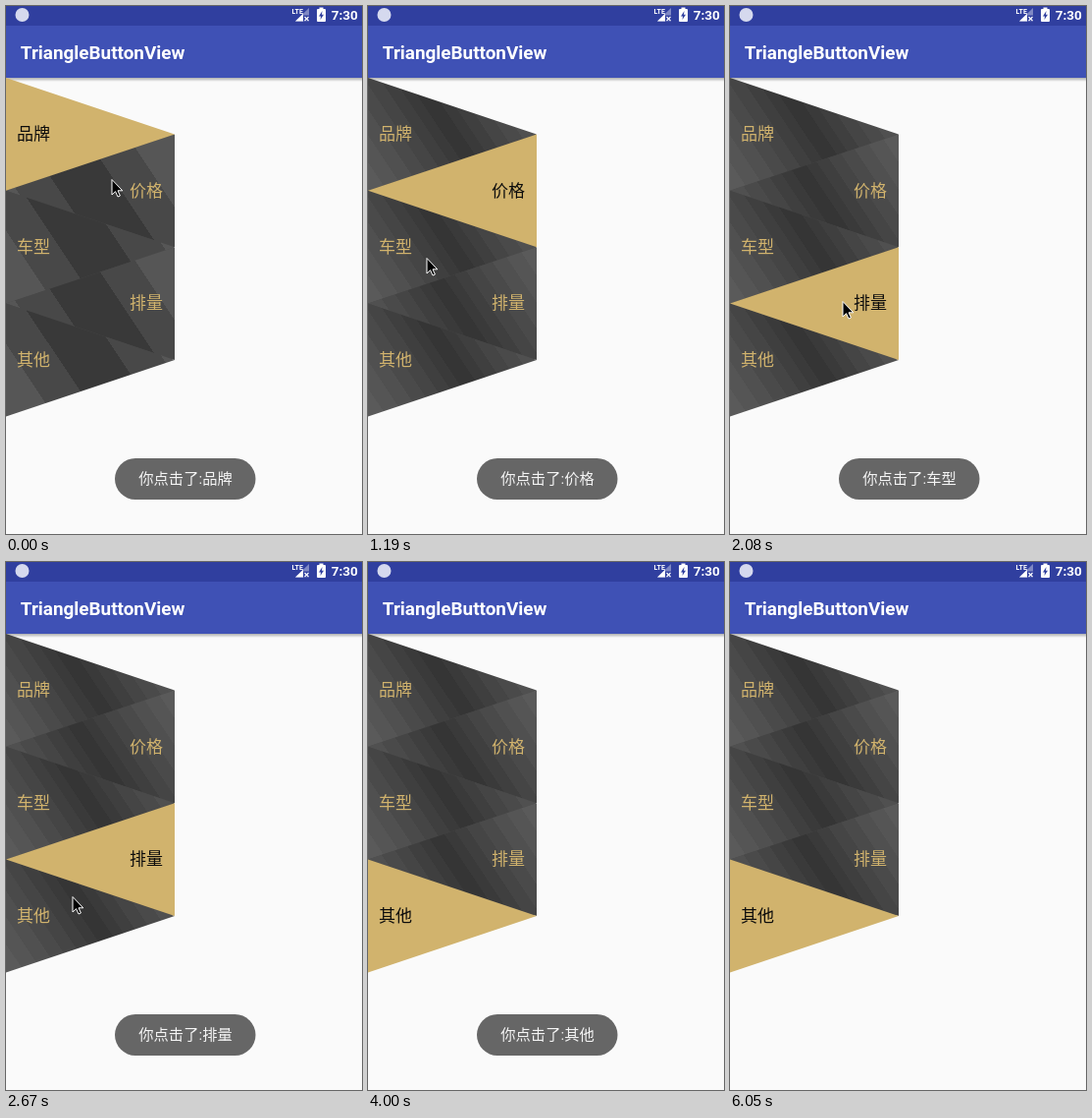
An HTML page with a canvas for the animation above (6.15 s loop, 363x537 px).

```html
<!DOCTYPE html>
<html lang="zh-CN">
<head>
<meta charset="utf-8">
<title>TriangleButtonView</title>
<style>
html, body { margin: 0; width: 100%; height: 100%; overflow: hidden; background: #fafafa; }
canvas { display: block; }
</style>
</head>
<body>
<canvas id="stage" width="363" height="537"></canvas>
<script>
const ctx = document.getElementById('stage').getContext('2d');
const LOOP = 6150, STEP = 148.3, TRAVEL = 300;
const TOP = 73, HALF = 57.4, WIDTH = 172;
const GOLD = '#d1b36d';
const FONT = 'Roboto, "Noto Sans CJK SC", "Noto Sans CJK", sans-serif';

const BUTTONS = [
  { label: '品牌', clicked: 0 },
  { label: '价格', clicked: 440 },
  { label: '车型', clicked: 1330 },
  { label: '排量', clicked: 2070 },
  { label: '其他', clicked: 3400 },
];
const POINTER_STOPS = [
  { arrive: 0, x: 108, y: 176 },
  { arrive: 1180, x: 60, y: 256 },
  { arrive: 2060, x: 115, y: 300 },
  { arrive: 2660, x: 68, y: 340 },
  { arrive: 2960, x: 45, y: 370 },
  { arrive: 4000, x: -14, y: 396 },
];

const clamp = k => Math.max(0, Math.min(1, k));
const mix = (a, b, k) => a + (b - a) * k;
const ease = k => (1 - Math.cos(Math.PI * clamp(k))) / 2;
const lastClicked = t => BUTTONS.filter(b => b.clicked <= t).pop() || BUTTONS[0];

function polygon(points, fill, stroke) {
  ctx.beginPath();
  points.forEach(([x, y]) => ctx.lineTo(x, y));
  ctx.closePath();
  ctx.fillStyle = fill;
  ctx.fill();
  if (stroke) {
    ctx.strokeStyle = stroke;
    ctx.lineWidth = 1;
    ctx.stroke();
  }
}

function rect(x, y, w, h, fill) {
  ctx.fillStyle = fill;
  ctx.fillRect(x, y, w, h);
}

function pill(x, y, w, h, r, fill) {
  ctx.beginPath();
  ctx.roundRect(x, y, w, h, r);
  ctx.fillStyle = fill;
  ctx.fill();
}

function text(str, x, y, size, fill, align = 'left', weight = 400) {
  ctx.font = `${weight} ${size}px ${FONT}`;
  ctx.textAlign = align;
  ctx.fillStyle = fill;
  ctx.fillText(str, x, y);
}

// Grey bands from bottom left to top right, darkest in the middle.
function bandedGradient(y, levels) {
  const gradient = ctx.createLinearGradient(0, y + 2 * HALF, WIDTH, y);
  const bandEdge = i => Math.sign(i) * (Math.abs(i) / levels) ** 1.25 / 2 + 0.5;
  for (let i = -levels; i < levels; i++) {
    const grey = Math.round(mix(50, 93, Math.abs(i + 0.5) / levels));
    const color = `rgb(${grey},${grey},${grey})`;
    gradient.addColorStop(bandEdge(i), color);
    gradient.addColorStop(bandEdge(i + 1), color);
  }
  return gradient;
}

function drawButton(index, selected, levels) {
  const y = TOP + index * HALF, right = index % 2;
  const base = right ? WIDTH : 0, tip = WIDTH - base;
  polygon([[base, y], [tip, y + HALF], [base, y + 2 * HALF]],
    selected ? GOLD : bandedGradient(y, levels));
  text(BUTTONS[index].label, right ? 160 : 11, y + HALF + 5.8, 17,
    selected ? '#0c0c0c' : GOLD, right ? 'right' : 'left');
}

function drawButtons(t) {
  const active = BUTTONS.indexOf(lastClicked(t));
  const levels = active === 0 ? 3 : 8;
  // inset backing hides the seams between neighbours
  polygon([[0, TOP + 1], [WIDTH - 1, TOP + HALF + 1],
    [WIDTH - 1, TOP + 5 * HALF - 1], [0, TOP + 6 * HALF - 1]], '#484848');
  BUTTONS.forEach((_, i) => { if (i !== active) drawButton(i, false, levels); });
  drawButton(active, true, levels);
}

function drawBars() {
  rect(0, 0, 363, 20, '#303f9f');
  rect(0, 20, 363, 53, '#3f51b5');
  const shadow = ctx.createLinearGradient(0, 73, 0, 77);
  shadow.addColorStop(0, 'rgba(0,0,0,.3)');
  shadow.addColorStop(1, 'rgba(0,0,0,0)');
  rect(0, 73, 363, 4, shadow);
  text('TriangleButtonView', 14.8, 54, 18.9, '#fff', 'left', 600);
  text('7:30', 358.8, 14, 13.5, '#fff', 'right', 600);
}

function drawStatusIcons() {
  pill(9.5, 2, 14, 14, 7, '#d5d9ee');
  text('LTE', 291.5, 8, 7, '#fff', 'left', 700);
  polygon([[295, 15.5], [309, 15.5], [309, 2]], '#8089c4');
  polygon([[295, 15.5], [303, 15.5], [303, 7.8]], '#fff');
  rect(303, 9.5, 6, 6, '#303f9f');
  ctx.strokeStyle = '#fff';
  ctx.lineWidth = 1.2;
  ctx.beginPath();
  ctx.moveTo(304.5, 11); ctx.lineTo(308.5, 15);
  ctx.moveTo(308.5, 11); ctx.lineTo(304.5, 15);
  ctx.stroke();
  pill(317, 3, 9, 13, 1, '#fff');
  rect(319.5, 1.5, 4, 2, '#fff');
  polygon([[322.5, 5], [319, 10.5], [321, 10.5], [320.5, 14], [324, 8.8], [322, 8.8]], '#303f9f');
}

function drawToast(t) {
  ctx.globalAlpha = 1 - ease((t - 5380) / 500);
  pill(111, 460, 143.5, 42, 21, '#666');
  // the message follows its click one step later
  text('你点击了:' + lastClicked(t - STEP).label, 183, 486, 15.3, '#f4f4f4', 'center');
  ctx.globalAlpha = 1;
}

function drawPointer(t) {
  let { x, y } = POINTER_STOPS[0];
  for (const stop of POINTER_STOPS.slice(1)) {
    const k = ease((t - stop.arrive + TRAVEL) / TRAVEL);
    x = mix(x, stop.x, k);
    y = mix(y, stop.y, k);
  }
  ctx.save();
  ctx.translate(Math.round(x), Math.round(y) + 0.5);
  polygon([[0, 0], [0, 15.5], [3.6, 12.2], [6, 17.5], [8.4, 16.5], [6, 11.3], [10.8, 11.3]],
    '#000', '#fff');
  ctx.restore();
}

function frame(now) {
  const t = Math.floor((now % LOOP + 8) / STEP) * STEP;
  rect(0, 0, 363, 537, '#fafafa');
  drawBars();
  drawStatusIcons();
  drawButtons(t);
  drawToast(t);
  drawPointer(t);
  requestAnimationFrame(frame);
}
requestAnimationFrame(frame);
</script>
</body>
</html>
```
